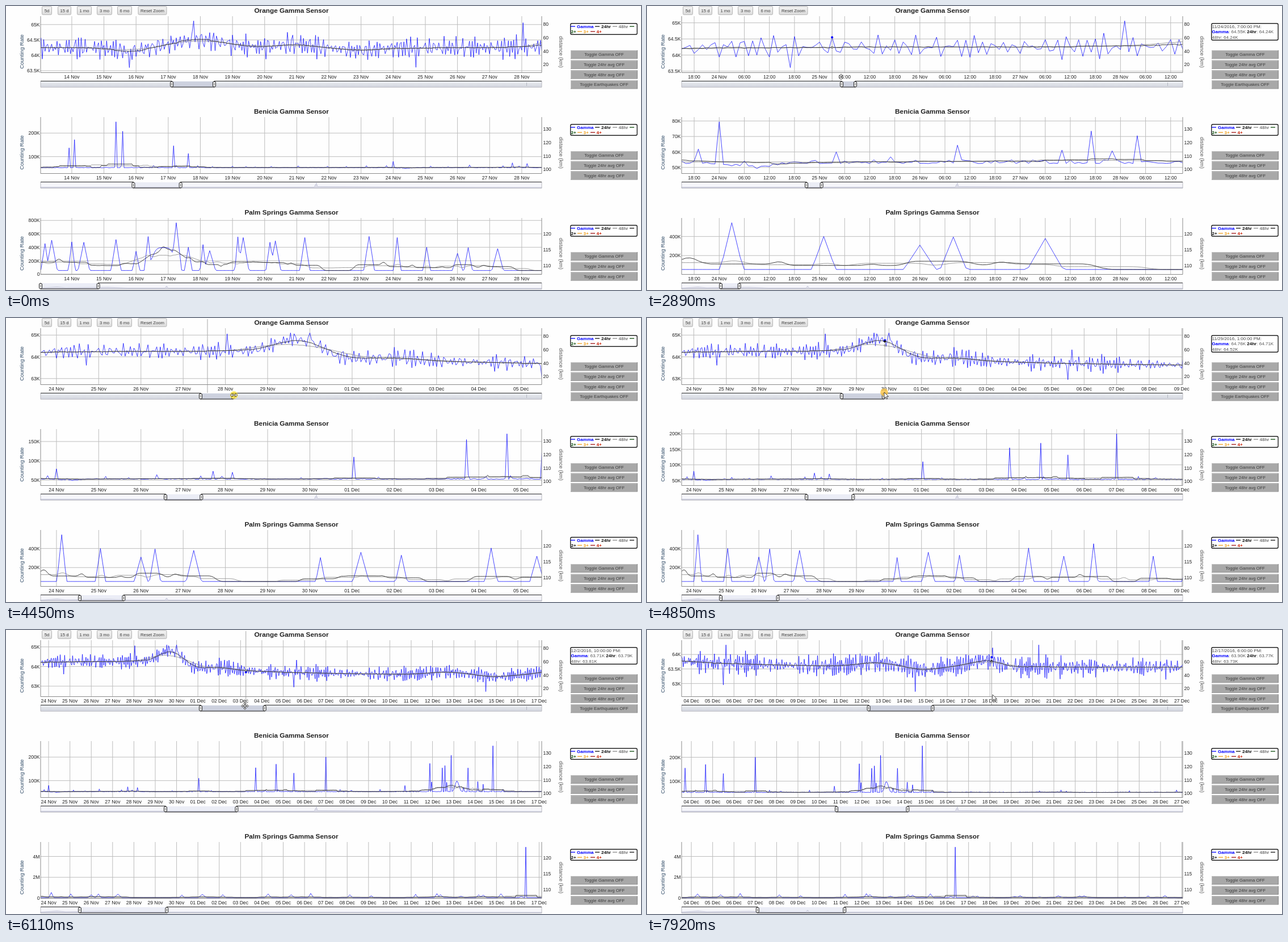
Recreate the animation shown at these times as an HTML page. Size 1119 by 501 pixels, loop 8 s.

```html
<!DOCTYPE html>
<html lang="en">
<head>
<meta charset="utf-8">
<title>Gamma sensors</title>
<style>
html, body { margin: 0; width: 100%; height: 100%; overflow: hidden; background: #fefefe; }
svg { display: block; }
text { font-family: "Liberation Sans", Arial, sans-serif; font-size: 8.6px; fill: #222; white-space: pre; }
.small { font-size: 7.7px; fill: #3c3c3c; }
.key { font-size: 8.05px; }
.b { font-weight: bold; }
</style>
</head>
<body>
<svg id="stage" width="1119" height="501" viewBox="0 0 1119 501"></svg>
<script>
const LOOP = 8000, LEFT = 61, RIGHT = 944, PITCH = 178;
const DAY0 = 23.625, H0 = -300, H1 = 870;   // days count from 0 Nov, hours from DAY0

const stage = document.getElementById('stage');
function set(el, attrs) { for (const k in attrs) el.setAttribute(k, attrs[k]); }
function add(parent, tag, attrs = {}, text) {
  const el = document.createElementNS('http://www.w3.org/2000/svg', tag);
  set(el, attrs);
  if (text !== undefined) el.textContent = text;
  parent.appendChild(el);
  return el;
}
const show = (el, on) => el.setAttribute('display', on ? 'inline' : 'none');
const line = (p, x1, y1, x2, y2, stroke, w = 1) => add(p, 'line', { x1, y1, x2, y2, stroke, 'stroke-width': w });
const label = (p, x, y, s, extra = {}) => add(p, 'text', { x, y, ...extra }, s);
const hourOf = d => Math.round((d - DAY0) * 24);
const dayOf = h => DAY0 + h / 24;

// column k of rows [x, a, b, ...] at x, joined by straight lines
function along(rows, x, k = 1) {
  const i = rows.findIndex(r => r[0] > x);
  if (i === 0) return rows[0][k];
  if (i < 0) return rows[rows.length - 1][k];
  const p = rows[i - 1], q = rows[i];
  return p[k] + (q[k] - p[k]) * (x - p[0]) / (q[0] - p[0]);
}
function rand(n) {
  let a = Math.imul(n + 7919, 0x9E3779B1);
  a = Math.imul(a ^ a >>> 15, 0x85EBCA6B);
  a = Math.imul(a ^ a >>> 13, 0xC2B2AE35);
  return ((a ^ a >>> 16) >>> 0) / 4294967296;
}
// sum of bell curves [centre, height, width]
const bells = (list, d) => list.reduce((s, [c, v, w]) => s + v * Math.exp(-(((d - c) / w) ** 2)), 0);
// jagged noise that averages out, -1 to 1
const jag = h => rand(h) - (rand(h - 1) + rand(h + 1)) / 2;

// hourly readings with [day, value] marks, then their 24 h and 48 h means
function series(raw, marks) {
  const hours = [];
  for (let h = H0; h <= H1; h++) hours.push(raw(h, dayOf(h)));
  marks.forEach(([d, v]) => hours[hourOf(d) - H0] = v);
  const mean = half => hours.map((_, i) => {
    const part = hours.slice(Math.max(0, i - half), i + half);
    return part.reduce((a, b) => a + b) / part.length;
  });
  return [hours, mean(12), mean(24)];
}

const swells = [[15.8, -.12, .6], [18, .25, 1.1], [20.9, .12, .6], [23, -.1, .7], [29.65, .58, .65],
  [32.1, .12, .5], [42.6, .14, 1], [45, -.1, .7], [47.7, .22, .9]];
function orangeLevel(d) {
  const before = 1 / (1 + Math.exp((d - 30.45) * 12));
  const after = 63.56 + .42 * Math.exp(-Math.max(0, d - 30.5) / 4.5);
  return after + (64.25 - after) * before + bells(swells, d);
}
const orange = series((h, d) => orangeLevel(d) + .52 * jag(h),
  [[15.78, 63.6], [17.8, 65.12], [24.71, 63.61], [25.125, 64.55], [28.04, 65.06], [29.875, 64.76], [30, 65.1],
    [33.25, 63.71], [35.5, 62.95], [35.62, 64.33], [44.5, 62.72], [48.125, 64.23], [50.3, 64.33]]);

const benicia = series((h, d) => {
  const storm = d > 40.7 && d < 45;
  const spike = rand(h + 2000) > (storm ? .92 : .95) ? rand(h + 4000) * (storm ? 50 : 10) : 0;
  return 52.5 + 2.5 * rand(h + 3000) ** 2 + spike + bells([[24.35, -3.5, .25], [43.15, 45, .12]], d);
}, [[13.91, 137], [14.07, 172], [15.37, 248], [15.57, 208], [17.16, 146], [17.62, 113], [24, 79.5],
  [27.71, 73.5], [28.17, 70.5], [31.04, 110], [33.71, 155], [34.67, 170], [35.5, 132], [37, 200],
  [41.87, 173], [42.46, 154], [42.6, 164], [42.88, 208], [43.66, 154], [44.83, 248]]);

// known surges first, seeded nightly ones around them
const surges = [[13.16, 455], [13.37, 505], [13.98, 480], [14.37, 475], [15.38, 515], [15.99, 340], [16.37, 560],
  [17.25, 765], [17.62, 400], [18.08, 440], [18.3, 350], [19.15, 555], [19.33, 545], [20.17, 475], [20.35, 495],
  [21.25, 545], [23.24, 562], [24.125, 545], [25.06, 400], [26.02, 310], [26.33, 395], [27.25, 380],
  [30.25, 305], [31.2, 360], [32.15, 330], [34.3, 405], [35.38, 320], [36.3, 450], [38.14, 320]];
for (let n = 11; n < 58; n++) {
  if (n > 12 && n < 39) continue;
  const top = n < 46 ? 500 : 260;
  [.16, .38].forEach((f, k) => {
    const r = rand(n * 2 + k + 60);
    if (r > .35) surges.push([n + f + (r - .6) * .2, top * r]);
  });
}
const palm = series((h, d) => {
  const shelf = 340 * Math.exp(-(((d - 16.85) / .4) ** 4));
  return surges.reduce((v, [c, top], i) => {
    const near = 1 - Math.abs(h - hourOf(c)) / (2.2 + 2.4 * rand(i + 300));
    return Math.max(v, 54 + (top - 54) * near);
  }, 54 + shelf);
}, [[46.375, 4900]]);

const charts = [
  { name: 'Orange', rows: orange, dist: [80, 60, 40, 20], top: 32, px: 4.8, at: 343, green: '#0a4a0a' },
  { name: 'Benicia', rows: benicia, dist: [130, 120, 110, 100], top: 39, px: 5.34, at: 281, green: '#0a4a0a' },
  { name: 'Palm Springs', rows: palm, dist: [120, 115, 110], top: 46, px: 6.53, at: 130, green: '#111' }
];

const defs = add(stage, 'defs');
function gradient(id, a, b) {
  const g = add(defs, 'linearGradient', { id, x2: 0, y2: 1 });
  add(g, 'stop', { offset: 0, 'stop-color': a });
  add(g, 'stop', { offset: 1, 'stop-color': b });
}
gradient('btn', '#f4f4f4', '#dcdcdc');
gradient('band', '#eceef2', '#d2d5de');
const clip = add(defs, 'clipPath', { id: 'plot' });
add(clip, 'rect', { x: LEFT, y: 18, width: RIGHT - LEFT, height: 99 });

function sideText(p, x, y, turn, s, fill, size) {
  label(p, 0, 0, s, { transform: `translate(${x} ${y}) rotate(${turn})`, 'text-anchor': 'middle',
    style: `font-size:${size}px;fill:${fill}` });
}

function buildPlot(c, g) {
  c.grid = add(g, 'g');
  const plot = add(g, 'g', { 'clip-path': 'url(#plot)' });
  c.cross = line(g, 0, 2, 0, 132, '#a8a8a8');
  c.paths = ['#00f', '#222', '#8c8c8c'].map((stroke, k) => add(plot, 'path',
    { fill: 'none', stroke, 'stroke-width': .85, 'stroke-opacity': k ? 1 : .85, 'stroke-linejoin': 'round' }));
  plot.insertBefore(c.paths[2], c.paths[1]);
  add(g, 'path', { d: `M${LEFT} 18V117.5H${RIGHT}V18`, fill: 'none', stroke: '#8a8a8a' });
  c.dots = ['#00f', '#111', '#999'].map(fill => add(g, 'circle', { r: 2, fill }));
  label(g, 503, 11.8, c.name + ' Gamma Sensor', { class: 'b', 'text-anchor': 'middle', style: 'font-size:11.8px' });
  sideText(g, 31, 80.5, -90, 'Counting Rate', '#2f4a66', 9.5);
  sideText(g, 974.5, 81, 90, 'distance (km)', '#555', 9.3);
  const gap = c.dist.length > 3 ? 23.8 : 28;
  c.dist.forEach((s, k) => label(g, 946.5, c.top + gap * k + 3, s));
}

function buildSelector(c, g, i) {
  add(g, 'rect', { x: LEFT, y: 133, width: RIGHT - LEFT, height: 10, fill: i ? '#f6f6fb' : 'url(#band)' });
  c.sel = add(g, 'rect', { y: 133, height: 10, fill: i ? '#e9ebf5' : '#c8cedc', 'fill-opacity': .8 });
  if (i) {
    const hump = i === 1 ? 'H543L547 134 549 140.5 700 141.5' : 'L90 139.5 105 141 180 140 215 141.5H280L283 138 286 141.5';
    add(g, 'path', { d: `M61 141.5${hump}L944 142V143H61Z`, fill: '#dcdce8', stroke: '#c2c4d6', 'stroke-width': .8 });
  } else line(g, 917.5, 135, 917.5, 141, '#b4b7c2');
  add(g, 'path', { d: `M${LEFT} 133V143.3H${RIGHT}V133`, fill: 'none', stroke: '#b9b9c0' });
  c.edge = add(g, 'path', { fill: 'none', stroke: '#2a2a2a', 'stroke-width': 1.1 });
  c.grips = [0, 1].map(() => {
    const grip = add(g, 'g');
    add(grip, 'rect', { x: -2.5, y: 133.5, width: 5, height: 9, rx: 1.6, fill: '#fff', stroke: '#222' });
    line(grip, 0, 135.5, 0, 140.5, '#555');
    return grip;
  });
}

function buildLegend(c, g) {
  c.box = add(g, 'rect', { x: 994.8, y: 30.7, width: 117.4, height: 19.6, rx: 2.5, fill: '#fff', stroke: '#222', 'stroke-width': 1.4 });
  c.key = add(g, 'g');
  const entry = (x, y, s, fill) => label(c.key, x, y, s, { class: 'key b', style: 'fill:' + fill });
  const dash = (x, y, stroke) => line(c.key, x, y, x + 8, y, stroke, 1.3);
  dash(995, 36, '#00f'); entry(1006, 39, 'Gamma', '#00f');
  dash(1038, 36, '#111'); entry(1049, 39, '24hr', '#111');
  dash(1069, 36, '#888'); entry(1079.5, 39, '48hr', '#777');
  dash(1099, 36, c.green); entry(995.5, 48, '2+', c.green);
  dash(1007, 45, '#f0a020'); entry(1017.5, 48, '3+', '#f0a020');
  dash(1030, 45, '#a01010'); entry(1040.5, 48, '4+', '#c81e00');

  c.info = add(g, 'g');
  c.when = label(c.info, 995.5, 39, '', { class: 'key', style: 'fill:#444' });
  const rows = [48.3, 57.6].map(y => add(c.info, 'text', { x: 995.5, y, class: 'key' }));
  c.vals = [['Gamma', '#00f', 0], [' 24hr', '#111', 0], ['48hr', '#555', 1]].map(([s, fill, r]) => {
    add(rows[r], 'tspan', { style: 'fill:' + fill, class: r ? '' : 'b' }, s);
    return add(rows[r], 'tspan', { style: 'fill:#555' });
  });
}

function buildToggles(g, names) {
  names.forEach((s, k) => {
    const y = 78 + k * 17.7;
    add(g, 'rect', { x: 995, y, width: 118, height: 15.2, fill: '#858585' });
    add(g, 'rect', { x: 995, y, width: 117, height: 14.2, fill: '#c4c4c4' });
    add(g, 'rect', { x: 996, y: y + 1, width: 116, height: 13.2, fill: '#a8a8a8' });
    label(g, 1054, y + 10.2, `Toggle ${s} OFF`, { class: 'small', 'text-anchor': 'middle' });
  });
}

charts.forEach((c, i) => {
  const g = add(stage, 'g', { transform: `translate(0 ${i * PITCH})` });
  buildPlot(c, g);
  buildSelector(c, g, i);
  buildLegend(c, g);
  buildToggles(g, ['Gamma', '24hr avg', '48hr avg', 'Earthquakes'].slice(0, i ? 3 : 4));
});

[['5d', 63, 18], ['15 d', 91, 24], ['1 mo', 125, 26], ['3 mo', 160, 27], ['6 mo', 196, 26], ['Reset Zoom', 232.5, 51]]
  .forEach(([s, x, w]) => {
    add(stage, 'rect', { x: x + .5, y: .8, width: w - 1, height: 14.4, rx: 1.5, fill: 'url(#btn)', stroke: '#b4b4b4' });
    label(stage, x + w / 2, 10.8, s, { class: 'small', 'text-anchor': 'middle' });
  });

const halo = add(stage, 'circle', { r: 6.8, 'fill-opacity': .8 });
const pointers = {
  arrow: 'M0 0V10.5L2.5 8.2 4.2 12 5.9 11.3 4.2 7.6H7.6Z',
  wide: 'M-6 0L-3 -3V-1H3V-3L6 0 3 3V1H-3V3Z',
  tall: 'M0 -5L3 -2H1V2H3L0 5 -3 2H-1V-2H-3Z',
  move: 'M0 -6.5L2.2 -4H.8V-.8H4V-2.2L6.5 0 4 2.2V.8H.8V4H2.2L0 6.5 -2.2 4H-.8V.8H-4V2.2L-6.5 0 -4 -2.2V-.8H-.8V-4H-2.2Z'
};
const cursor = add(stage, 'path', { fill: '#fff', stroke: '#222', 'stroke-width': .8 });

// bursts of change: first, last, count
const bursts = [[220, 990, 11], [1070, 1620, 8], [1860, 2030, 3], [2490, 3040, 8], [3200, 3200, 1], [3350, 3430, 2],
  [3660, 3740, 2], [3890, 4690, 11], [4770, 5560, 11], [5720, 6110, 6], [6260, 6340, 2], [6500, 7210, 10], [7520, 7920, 6]];
function snap(t) {
  const burst = bursts.filter(b => b[0] <= t).pop();
  if (!burst) return 0;
  const [a, b, n] = burst, step = (b - a) / (n - 1) || 1;
  return a + step * Math.min(n - 1, Math.floor((t - a) / step + 1e-6));
}

const stretch = [[3810, 28.62], [4050, 29.97], [4690, 38.8], [4770, 39.03], [4849, 39.03], [5560, 47.12]];
const pan = [[6420, 0], [6973, 4.9], [7210, 9.92]];
const mouse = [[220, 1106, 392], [990, 152, 10], [1620, 68, 7], [2412, 70, 8], [2883, 342, 125], [3040, 375, 136],
  [3890, 367, 137], [4050, 376, 136], [4690, 417, 136], [4849, 418, 131], [5560, 456, 136], [6110, 421, 134],
  [6500, 422, 134], [6973, 455, 135], [7210, 468, 135], [7440, 468, 135], [7920, 609, 114]];
const within = (t, ...spans) => spans.some(([a, b]) => t >= a && t < b);

// crosshair x and whether its readings show
function hoverAt(t, x, y) {
  if (within(t, [220, 1000])) {
    const i = within(y, [18, 133]) ? 0 : within(y, [196, 311]) ? 1 : -1;
    return i >= 0 && x < RIGHT ? { i, x, live: true } : null;
  }
  if (t < 2490 || y < 18) return null;
  if (t < 3035) return { i: 0, x: x - 16, live: true };
  if (t < 4770) return { i: 0, x: 355, live: false };
  if (t < 5720) return { i: 0, x: 419, live: t < 4900 };
  if (t < 6500) return { i: 0, x: x + 1.5, live: true };
  if (t < 7520) return { i: 0, x: 422.5, live: false };
  return { i: 0, x: x - 1, live: true };
}

function niceStep(min) {
  const p = 10 ** Math.floor(Math.log10(min));
  return p * [1, 2, 5, 10].find(m => m * p >= min);
}
const unit = v => v === 0 ? '0' : v >= 1000 ? v / 1000 + 'M' : +v.toFixed(1) + 'K';
function xLabel(d) {
  const part = d % 1, n = Math.floor(d);
  return part ? String(part * 24).padStart(2, '0') + ':00' : n > 30 ? String(n - 30).padStart(2, '0') + ' Dec' : n + ' Nov';
}
function stamp(h) {
  const d = new Date(Date.UTC(2016, 10, 1) + (dayOf(h) - 1 - 1 / 3) * 864e5);   // eight hours behind the axis
  const hr = d.getUTCHours();
  return `${d.getUTCMonth() + 1}/${d.getUTCDate()}/2016, ${hr % 12 || 12}:00:00 ${hr < 12 ? 'AM' : 'PM'}:`;
}

function drawChart(c, i, from, to, hover) {
  const ppd = (RIGHT - LEFT) / (to - from), X = d => LEFT + (d - from) * ppd;
  const a = Math.floor((from - DAY0) * 24), b = Math.ceil((to - DAY0) * 24);
  const seen = c.rows.map(row => row.slice(a - H0, b - H0 + 1));
  const lo = Math.min(...seen.flat()), hi = Math.max(...seen.flat());
  const pad = (hi - lo) * .1, min = Math.max(0, lo - pad), ppu = 99 / (hi + pad - min);
  const Y = v => 117 - (v - min) * ppu;

  seen.forEach((row, k) => {
    const pts = row.map((v, n) => X(dayOf(a + n)).toFixed(1) + ' ' + Y(v).toFixed(1));
    c.paths[k].setAttribute('d', 'M' + pts.join('L'));
  });

  c.grid.textContent = '';
  const step = niceStep(22 / ppu), gray = '#bdbdbd';
  for (let n = Math.ceil(min / step); Y(n * step) >= 18; n++) {
    const y = Y(n * step);
    line(c.grid, LEFT, y, RIGHT, y, gray);
    label(c.grid, 59.5, y + 3.2, unit(n * step), { 'text-anchor': 'end' });
  }
  const gap = to - from < 6 ? .25 : 1;
  for (let d = Math.ceil(from / gap) * gap; d <= to; d += gap) {
    line(c.grid, X(d), 18, X(d), 117, gray);
    label(c.grid, X(d), 127.8, xLabel(d), { 'text-anchor': 'middle' });
  }

  const s = Math.max(LEFT, c.at + (from - DAY0) * c.px), e = c.at + (to - DAY0) * c.px;
  set(c.sel, { x: s, width: e - s });
  c.edge.setAttribute('d', `M${LEFT} 132.5H${s}V143H${e}V132.5H${RIGHT}`);
  [s, e].forEach((x, k) => set(c.grips[k], { transform: `translate(${x})` }));

  const here = hover && hover.i === i, live = here && hover.live;
  show(c.cross, here);
  show(c.key, !live);
  show(c.info, live);
  c.dots.forEach(dot => show(dot, live));
  c.box.setAttribute('height', live ? 29.6 : 19.6);
  if (!here) return;
  const h = hourOf(from + (hover.x - LEFT) / ppd), x = live ? X(dayOf(h)) : hover.x;
  set(c.cross, { x1: x, x2: x });
  if (!live) return;
  c.when.textContent = stamp(h);
  c.rows.forEach((row, k) => {
    const v = row[h - H0];
    c.vals[k].textContent = `: ${v.toFixed(2)}K`;
    set(c.dots[k], { cx: x, cy: Y(v) });
  });
}

function drawPointer(t, x, y) {
  const kind = within(t, [2880, 2960]) ? 'tall'
    : within(t, [3660, 4770], [4900, 5720]) ? 'wide'
    : within(t, [5720, 7520]) ? 'move' : 'arrow';
  set(cursor, { d: pointers[kind], transform: `translate(${x} ${y})` });
  show(cursor, t >= 220);
  show(halo, within(t, [1860, 2030], [3660, 5720], [6260, 7520]));
  set(halo, { cx: x, cy: y, fill: within(t, [4770, 4900], [6500, 7520]) ? '#f8c244' : '#f7e03c' });
}

let last = -1;
function render(now) {
  const t = snap(now % LOOP);
  if (t === last) return;
  last = t;
  const x = along(mouse, t), y = along(mouse, t, 2), shift = along(pan, t);
  const from = (t < 1945 ? 13.03 : DAY0) + shift, to = along(stretch, t) + shift;
  const hover = hoverAt(t, x, y);
  charts.forEach((c, i) => drawChart(c, i, from, to, hover));
  drawPointer(t, x, y);
}
const begin = performance.now();
render(0);
requestAnimationFrame(function tick() {
  render(performance.now() - begin);
  requestAnimationFrame(tick);
});
</script>
</body>
</html>
```
